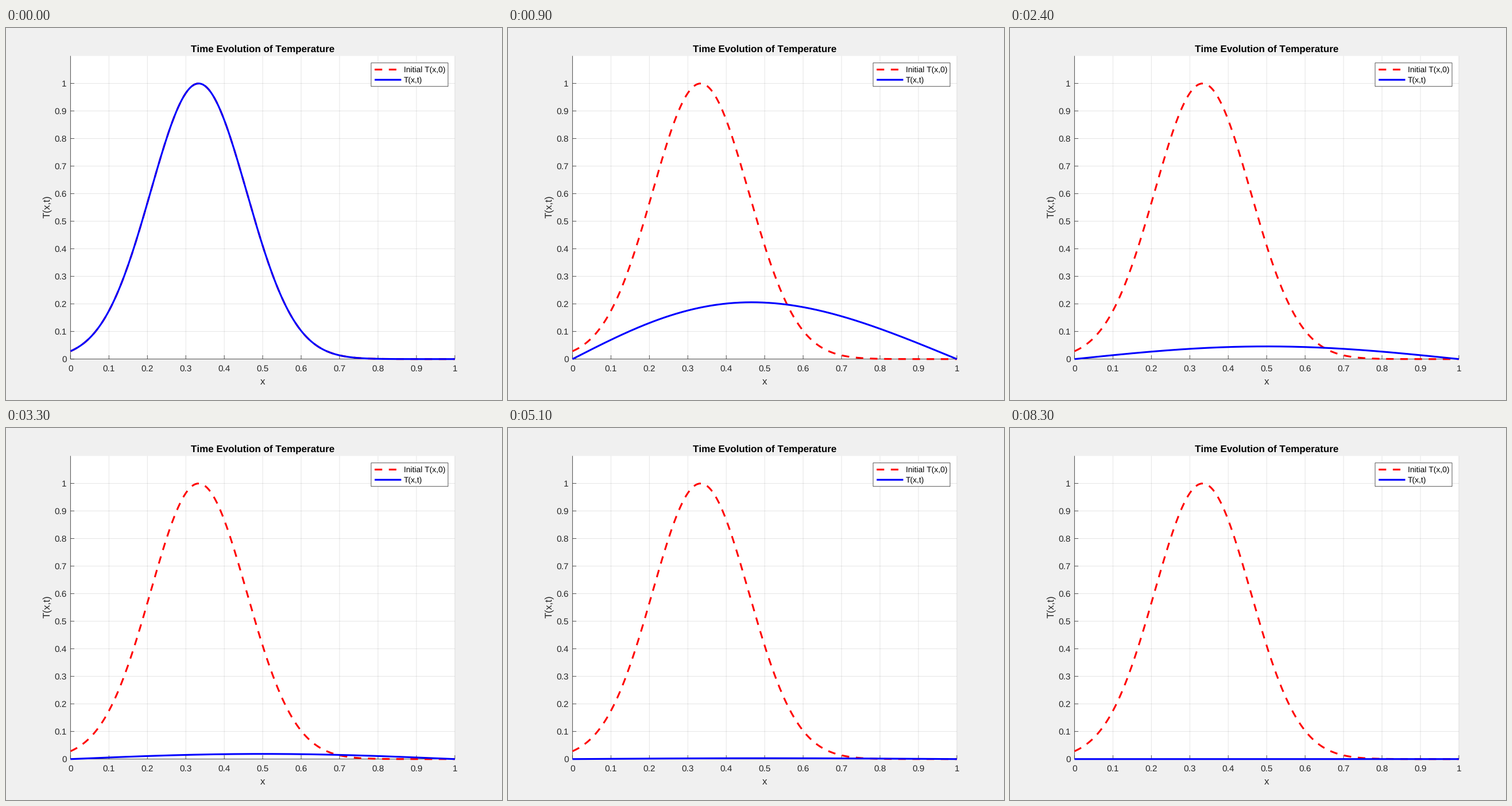
Write a matplotlib script that moves like this. It is 864 by 648 pixels and loops after 10000 ms.

```python
import numpy as np
import matplotlib.pyplot as plt
from matplotlib.animation import FuncAnimation
from matplotlib.patches import Rectangle

W, H = 864, 648
FRAMES, INTERVAL = 100, 100
SCALE = W / 560          # screen pixels per layout unit
INK = "#262626"
THIN, THICK = 0.5 * SCALE, 2 * SCALE

plt.rcParams.update({
    "font.family": "Liberation Sans",
    "text.hinting": "none",
    "text.kerning_factor": 6,
})

# At 72 dpi one point is one pixel.
fig = plt.figure(figsize=(W / 72, H / 72), dpi=72, facecolor="#f0f0f0")


def initial(x):
    return np.exp(-32 * (x - 1 / 3) ** 2)


# Heat equation with both ends held at zero, solved as a sine series.
x = np.linspace(0, 1, 201)
modes = np.arange(1, 41)
fine = np.linspace(0, 1, 4001)
coeffs = 2 * np.sin(np.pi * np.outer(modes, fine)) @ initial(fine) / 4000
basis = np.sin(np.pi * np.outer(x, modes))
times = np.linspace(0, 1, FRAMES)


def temperature(t):
    if t == 0:
        return initial(x)
    return basis @ (coeffs * np.exp(-(np.pi * modes) ** 2 * t))


# Plot area
ax = fig.add_axes([0.13, 0.11, 0.775, 0.815])
ax.set(xlim=(0, 1), ylim=(0, 1.1))
ax.patch.set_snap(False)
ax.tick_params(length=0, labelleft=False, labelbottom=False)
for spine in ax.spines.values():
    spine.set_visible(False)


def rule(xs, ys, **style):
    ax.plot(xs, ys, color=INK, lw=THIN, snap=False, clip_on=False,
            solid_capstyle="butt", zorder=1, **style)


ticks = np.arange(11) / 10
tick_w, tick_h = 0.01, 0.01 * 1.1 * 0.775 * W / (0.815 * H)
for v in ticks:
    rule([v, v], [0, 1.1], alpha=0.15)
    rule([0, 1], [v, v], alpha=0.15)
    rule([v, v], [0, tick_h])
    rule([0, tick_w], [v, v])
rule([0, 0], [0, 1.1])
rule([0, 1], [0, 0])

red = dict(color="#ff0000", lw=THICK, ls=(0, (4.25, 3.75)),
           dash_capstyle="butt", snap=False)
blue = dict(color="#0000ff", lw=THICK, solid_capstyle="butt", snap=False)
ax.plot(x, initial(x), clip_on=False, **red)
curve, = ax.plot(x, initial(x), clip_on=False, **blue)

# Overlay in pixel coordinates for the lettering and the legend
page = fig.add_axes([0, 0, 1, 1])
page.set(xlim=(0, W), ylim=(H, 0))
page.axis("off")


def write(px, py, text, size, color=INK, ha="center", **style):
    page.text(px, py, text, fontsize=size * SCALE, color=color, ha=ha,
              va="baseline", **style)


for v in ticks:
    write((0.13 + 0.775 * v) * W, 598.1, f"{v:g}", 10)
    write(105.6, (0.89 - 0.815 * v / 1.1) * H + 5.2, f"{v:g}", 10, ha="right")

write(447.1, 41.9, "Time Evolution of Temperature", 11, "black",
      weight="bold")
write(447.1, 620.8, "x", 11)
write(75.8, 311.5, "T(x,t)", 11, rotation=90, rotation_mode="anchor")

page.add_patch(Rectangle((636, 60.8), 134, 41, facecolor="white",
                         edgecolor=INK, linewidth=THIN, snap=False))
for row, label, style in ((72.4, "Initial T(x,0)", red),
                          (90.2, "T(x,t)", blue)):
    page.plot([642.2, 688.5], [row, row], **style)
    write(692.7, row + 5.1, label, 9, "black", ha="left")


def update(i):
    curve.set_ydata(temperature(times[i]))
    return curve,


anim = FuncAnimation(fig, update, frames=FRAMES, interval=INTERVAL,
                     repeat=True, repeat_delay=0, blit=False)
plt.show()
```
